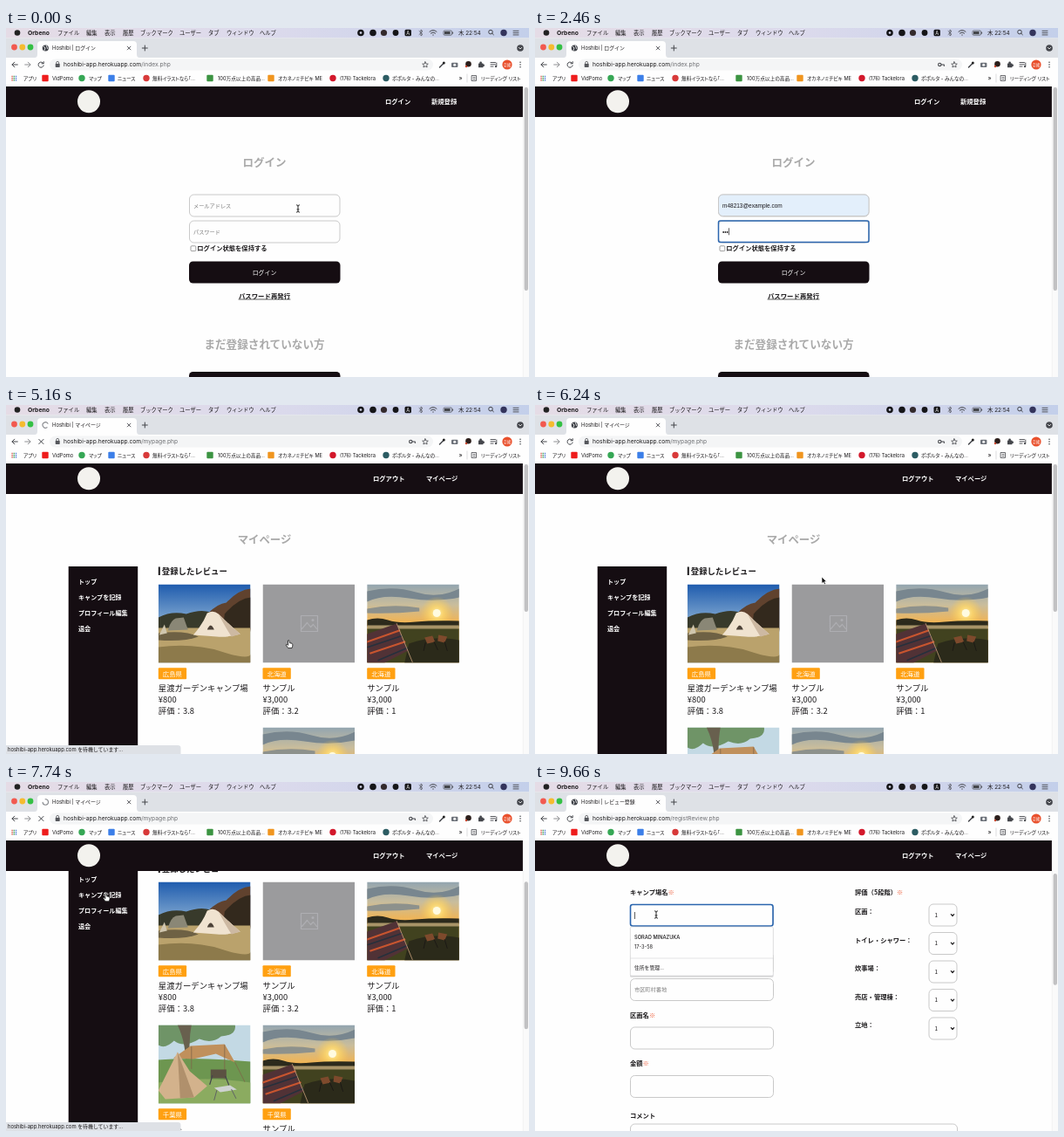
Write an HTML page that moves like this. It is 600x400 px and loops after 9.72 s.

```html
<!DOCTYPE html>
<html lang="ja">
<head>
<meta charset="utf-8">
<style>
html, body { margin: 0; width: 100%; height: 100%; overflow: hidden; background: #fff; }
svg { display: block; width: 100vw; height: 100vh; }
.ui { font-family: Inter, "Noto Sans CJK JP", "Noto Sans CJK", sans-serif; }
.pg { font-family: "Noto Sans CJK JP", "Noto Sans CJK", sans-serif; font-weight: 500; }
.in { font-family: "Liberation Sans", "Noto Sans CJK JP", "Noto Sans CJK", sans-serif; }
.b { font-weight: 700; }
.tight { font-feature-settings: "palt"; }
</style>
</head>
<body>
<svg id="stage" viewBox="0 0 600 400"></svg>
<script>
const INK = '#1c1a1c', DARK = '#150d12', PAPER = '#fefefe', LINE = '#c9c9c9', MUTE = '#a9a9a9', HINT = '#7d7d7d';
const RED = '#ee5a36', BLUE = '#2a65ae', FRAME = '#dee1e6', ICON = '#44464b';
const LOOP = 9720, STEP = 60, SITE = 'hoshibi-app.herokuapp.com';

// y is the vertical centre of the line
const txt = (x, y, s, size = 7.3, fill = INK, cls = 'pg', more = '') =>
  `<text x="${x}" y="${(y + size * .37).toFixed(2)}" font-size="${size}" fill="${fill}" class="${cls}" ${more}>${s}</text>`;
const mid = (x, y, s, size, fill, cls) => txt(x, y, s, size, fill, cls, 'text-anchor="middle"');
const bold = (x, y, s, size = 7.3, fill = INK) => txt(x, y, s, size, fill, 'pg b');
const box = (x, y, w, h, fill, r = 0, more = '') =>
  `<rect x="${x}" y="${y}" width="${w}" height="${h}" rx="${r}" fill="${fill}" ${more}/>`;
const dot = (x, y, r, fill) => `<circle cx="${x}" cy="${y}" r="${r}" fill="${fill}"/>`;
const line = (d, w = 1, c = ICON) =>
  `<path d="${d}" fill="none" stroke="${c}" stroke-width="${w}" stroke-linecap="round" stroke-linejoin="round"/>`;
const fill = (d, c) => `<path d="${d}" fill="${c}"/>`;
const g = (id, body, more = '') => `<g id="${id}" ${more}>${body}</g>`;
const field = (x, y, w, h = 25) => box(x, y, w, h, PAPER, 5, `stroke="${LINE}"`);
const star = `<tspan fill="${RED}">※</tspan>`;

function menuBar() {
  const items = [[59, 'ファイル'], [92, '編集'], [113, '表示'], [134, '履歴'], [154, 'ブックマーク'],
    [199, 'ユーザー'], [232, 'タブ'], [253, 'ウィンドウ'], [291, 'ヘルプ']];
  return box(0, 0, 600, 11.5, 'url(#menu)') + dot(13, 5.5, 3.3, '#222') +
    txt(25, 5.5, 'Orbeno', 6.8, INK, 'ui b') +
    items.map(([x, s]) => txt(x, 5.5, s, 6.3, INK, 'ui')).join('') +
    dot(407, 5.5, 3.8, '#151518') + dot(407, 5.5, 1.3, '#d8d8ea') + dot(421, 5.5, 3.8, '#151518') +
    dot(433.5, 5.5, 3.6, '#33292c') + dot(447, 5.5, 3.4, '#151518') +
    box(457.5, 1.8, 7.4, 7.4, '#151518', 1.5) + mid(461.2, 5.5, 'A', 5.6, '#fff', 'ui') +
    line('M474 3.5 L478 7.3 L476 9 V2 L478 3.7 L474 7.5', .7) +
    line('M486 4.2 Q490 .8 494 4.2 M487.4 6 Q490 3.8 492.6 6 M489.7 8 H490.3', 1) +
    box(502, 3, 9.5, 5.2, 'none', 1.2, `stroke="${ICON}" stroke-width=".7"`) + box(503, 4, 6.6, 3.2, ICON) +
    box(512.2, 4.6, .9, 2, ICON) + txt(519, 5.5, '木 22:54', 6.4, INK, 'ui') +
    line('M559.4 7.8 L557.6 6') + `<circle cx="556" cy="4.6" r="2.3" fill="none" stroke="${ICON}"/>` +
    dot(571, 5.5, 3.7, '#34345c') + line('M582 3.3 H588 M582 5.6 H588 M582 7.9 H588', .9);
}

function tabs() {
  return box(0, 11.5, 600, 22.5, FRAME) +
    dot(9.5, 22, 3.4, '#f2594f') + dot(18.8, 22, 3.4, '#f5bb2f') + dot(28, 22, 3.4, '#34c044') +
    fill('M33 34 Q36 34 36 30 V19 Q36 15 40 15 H146 Q150 15 150 19 V30 Q150 34 153 34 Z', PAPER) +
    g('globe', dot(45.3, 23, 3.6, '#404349') + line('M43 21 L45 23 L44 25.5 M46.5 20.5 L47.5 23.5', .9, '#eee')) +
    g('spin', line('M45.3 19.8 A3.2 3.2 0 1 0 48.5 23', 1.1, '#85878c')) +
    g('title', '', 'clip-path="url(#tabClip)"') +
    line('M139.3 21.2 L143 24.9 M143 21.2 L139.3 24.9', .9) + line('M156.3 23 H162.3 M159.3 20 V26', 1) +
    dot(590, 23, 3.8, '#45474d') + line('M588.4 22.4 L590 24 L591.6 22.4', .8, '#fff');
}

function toolbar() {
  return box(0, 34, 600, 33, PAPER) + box(50, 35.5, 440, 13, '#f4f5f6', 6.5) +
    line('M13.3 42 H7 M9.7 39.2 L7 42 L9.7 44.8') + line('M21.7 42 H28 M25.3 39.2 L28 42 L25.3 44.8', 1, '#8e8f92') +
    g('reload', line('M42.9 40.6 A3.1 3.1 0 1 0 43.2 43 M43.2 38.6 V40.8 H41')) +
    g('stop', line('M37.8 39.4 L43 44.6 M43 39.4 L37.8 44.6')) +
    box(56.7, 41, 5, 3.9, '#55575c', .6) + line('M57.8 41 V39.8 A1.4 1.4 0 0 1 60.6 39.8 V41', .8) + g('url', '') +
    g('key', `<circle cx="464.3" cy="42" r="1.7" fill="none" stroke="${ICON}" stroke-width="1.1"/>` + line('M466 42 H469.3 V43.4', 1.1)) +
    line('M481 38.8 L482 41 L484.3 41.2 L482.6 42.7 L483.1 45 L481 43.8 L478.9 45 L479.4 42.7 L477.7 41.2 L480 41 Z', .8) +
    line('M497.5 45 L502 40.5', 1.5) + dot(502.3, 40, 1.5, '#222') +
    box(511, 39.7, 7.4, 5.2, '#6b7078', 1) + dot(514.7, 42.3, 1.5, '#f5f5f5') +
    dot(530.5, 41.2, 3.3, '#2a1d1a') + dot(528, 44, 1.2, '#c6432b') +
    box(542, 40.4, 5.5, 4.8, ICON, .5) + dot(544.6, 40, 1.4, ICON) + dot(547.7, 42.7, 1.3, ICON) +
    line('M556 39.5 H561.5 M556 41.8 H561.5 M556 44.1 H559 M562.8 40 V44', .9) + dot(562, 44.2, 1.1, ICON) +
    dot(575, 42, 5.6, '#e9502c') + mid(575, 42, '空緒', 4.2, '#fff', 'ui') +
    [39.3, 42, 44.7].map(y => dot(590, y, .8, ICON)).join('');
}

function bookmarks() {
  const y = 57.5, items = [[20, 'アプリ'], [53, 'VidPomo', 45, '#ee1c1c', 1], [95, 'マップ', 87, '#36a755'],
    [128, 'ニュース', 121, '#3c7fe8', 1], [168, '無料イラストなら「...', 161, '#d83a3a'],
    [243, '100万点以上の高品...', 234, '#3c9442', 1], [312, 'オカネノミチビキ ME', 304, '#f0951f', 1],
    [383, '(176) Tackelora', 375, '#d3182b'], [443, 'ポポルタ - みんなの...', 436, '#2c5c63']];
  const label = (x, s) => txt(x, y, s, 5.7, INK, 'ui tight');
  let s = '';
  for (let i = 0; i < 9; i++)
    s += box(6.4 + i % 3 * 2.2, 54.8 + Math.floor(i / 3) * 2.2, 1.4, 1.4, ['#d65a4e', '#3f9a56', '#4a78d5'][i % 3]);
  for (const [x, name, ix, c, sq] of items)
    s += label(x, name) + (ix ? sq ? box(ix - 3.7, y - 3.7, 7.4, 7.4, c, 1) : dot(ix, y, 3.7, c) : '');
  return s + txt(519.5, y, '»', 7, INK, 'ui') + line('M529 53 V62', .6, '#c6c7ca') +
    line('M534.5 54.5 H539.5 V60.5 H534.5 Z M536 56.5 H538 M536 58.5 H538', .8) + label(545, 'リーディング リスト');
}

function login() {
  return mid(296.5, 154, 'ログイン', 12.5, MUTE, 'pg b') + field(210.5, 191, 172.5) + field(210.5, 221, 172.5) +
    g('mailFill', box(210.5, 191, 172.5, 24.5, '#e3effb', 5, `stroke="${LINE}"`) +
      txt(215, 203.3, 'm48213@example.com', 6.5, INK, 'in')) +
    g('mailHint', txt(215, 203.3, 'メールアドレス', 6.2, HINT)) +
    g('passHint', txt(215, 233.3, 'パスワード', 6.2, HINT)) +
    g('ring', box(210.5, 0, 172.5, 24.5, 'none', 2, `stroke="${BLUE}" stroke-width="1.5"`)) +
    g('dots', '') + g('caret', box(0, -4, .7, 8, INK)) +
    box(212, 249.8, 5.8, 5.8, '#fff', 1, 'stroke="#777" stroke-width=".7"') +
    bold(219.3, 252.7, 'ログイン状態を保持する') + box(210, 267.5, 173.5, 25, DARK, 4.5) +
    mid(296.5, 280.2, 'ログイン', 6.9, '#fff') + mid(296.5, 306.8, 'パスワード再発行', 7.4, INK, 'pg b') +
    line('M267 311 H326', .7, INK) +
    mid(296.5, 362.5, 'まだ登録されていない方', 12.6, MUTE, 'pg b') + box(210, 394, 173.5, 25, DARK, 4.5);
}

// photos are drawn in a 105.5 x 90 frame
const photos = {
  field: box(0, 0, 106, 90, 'url(#blue)') +
    fill('M56 34 Q68 22 78 21 Q92 6 106 5 V54 H53 Z', '#60422e') + fill('M76 34 Q92 16 106 15 V52 H74 Z', '#33291d') +
    fill('M0 38 Q15 30 32 34 Q48 28 60 32 V53 H0 Z', '#383a2b') + box(0, 50, 106, 40, '#baa26c') +
    fill('M0 56 Q30 52 46 60 Q30 66 0 64 Z', '#6e6144') + fill('M0 72 Q40 67 72 77 T106 80 V90 H0 Z', '#8d7a4b') +
    fill('M11 53 Q14 41 20 39 L29 38 L34 52 Z', '#8a8776') + fill('M1 58 L7 46 L10 56 Z', '#d0c6ae') +
    fill('M40 58 Q51 46 56 33 Q63 29 69 34 Q80 45 94 57 Q80 61 67 60 Z', '#f0e3d0') +
    fill('M69 34 Q80 45 94 57 L84 60 Q76 48 69 34 Z', '#cdb9a2') + fill('M56 52 Q60 42 64 52 Z', '#4d4238'),
  none: box(0, 0, 106, 90, '#9b9b9d') + line('M44 36 H63 V54 H44 Z M45 51 L51 44 L55 49 L58 46 L62 51', 1.2, '#aeaeb2') +
    dot(57.5, 41, 1.5, '#aeaeb2'),
  dusk: box(0, 0, 106, 90, 'url(#dusk)') + fill('M0 8 Q30 1 56 9 T106 5 V15 Q78 21 48 16 T0 20 Z', '#78868f') +
    fill('M0 28 Q30 22 60 27 V31 Q30 34 0 33 Z', '#8d918c') + dot(80, 33, 19, 'url(#sun)') + dot(80, 33, 4.5, '#fffbe0') +
    fill('M0 41 Q12 37 24 41 T56 43 T106 42 V48 H0 Z', '#2c2a1c') + box(0, 47, 106, 5, '#a89468') +
    box(0, 51, 106, 39, '#41421f') + fill('M48 68 Q76 58 106 64 V90 H43 Z', '#2b2a1a') +
    fill('M0 57 L34 45 L47 76 L20 90 H0 Z', '#513236') +
    line('M0 66 L37 53 M4 79 L43 66', 2.2, '#c8552f') + line('M1 72 L40 59 M13 87 L46 73', 1.7, '#26303c') +
    line('M34 45 L52 89', .8, '#caa37b') + fill('M66 61 L75 59 L78 66 L69 68 Z M82 58 L92 60 L89 67 L81 65 Z', '#7e4a2c') +
    line('M67 67 L65 76 M77 66 L81 75 M89 66 L92 76', 1, '#1c1915'),
  tent: box(0, 0, 106, 90, '#c3d9e4') + fill('M0 0 H88 Q90 12 72 13 Q62 22 47 16 Q29 27 18 18 Q8 28 0 23 Z', '#6f9467') +
    fill('M22 0 H38 Q34 20 37 52 H31 Q33 23 22 0 Z', '#68604e') + fill('M0 40 Q40 36 106 42 V90 H0 Z', '#6d9650') +
    fill('M0 66 Q55 58 106 66 V90 H0 Z', '#8bab60') + fill('M17 38 L37 24 L76 22 L88 43 L66 33 L40 39 Z', '#c0905c') +
    line('M76 23 V62 M88 43 L99 65 M38 25 V50', .8, '#7f6648') + fill('M0 75 L22 31 L36 53 L56 70 L41 83 L8 85 Z', '#d3b28c') +
    fill('M22 31 L25 84 L41 83 Z', '#b0906c') + fill('M60 51 H78 V61 H60 Z', '#5b5242') + line('M62 58 L59 68 M77 59 L81 69', 1.2) +
    fill('M64 72 L82 69 L90 74 L71 77 Z', '#cfd3d2') + line('M67 75 L64 86 M84 74 L89 84', 1, '#5f6264')
};

function card(i, photo, pref, name, price, rate) {
  const x = 174.8 + i % 3 * 119.7, y = 205.5 + Math.floor(i / 3) * 164;
  return `<g transform="translate(${x} ${y})"><g id="photo${i}" clip-path="url(#photoClip)">${photos[photo]}</g>` +
    box(0, 95.7, 32.3, 13, '#ffa011', 1) + mid(16.1, 102.3, pref, 7.4, '#fff') + txt(0, 119, name, 9.4) +
    txt(0, 132, price, 9.4) + txt(0, 144.7, '評価：' + rate, 9.4) + '</g>';
}

function myPage() {
  return mid(296.5, 154, 'マイページ', 12.4, MUTE, 'pg b') + box(71.7, 185, 79.5, 300, DARK) +
    ['トップ', 'キャンプを記録', 'プロフィール編集', '退会'].map((s, i) => bold(83, 202 + i * 18, s, 7.1, '#fff')).join('') +
    box(174.8, 185.5, 2, 9.5, INK) + bold(178.8, 190.3, '登録したレビュー', 9.4) +
    card(0, 'field', '広島県', '星渡ガーデンキャンプ場', '¥800', '3.8') + card(1, 'none', '北海道', 'サンプル', '¥3,000', '3.2') +
    card(2, 'dusk', '北海道', 'サンプル', '¥3,000', '1') + card(3, 'tent', '千葉県', 'テスト', '¥3,000', '3') +
    card(4, 'dusk', '千葉県', 'サンプル', '¥3,000', '3');
}

function review() {
  const arrow = (x, y) => line(`M${x - 1.7} ${y - .8} L${x} ${y + 1} L${x + 1.7} ${y - .8}`, 1.2, INK);
  const rows = ['区画', 'トイレ・シャワー', '炊事場', '売店・管理棟', '立地'];
  return mid(296.5, 154, 'レビュー登録', 12.4, MUTE, 'pg b') + bold(109, 189.5, star + 'は必須入力項目です。') +
    g('form', bold(0, 222.5, 'キャンプ場名' + star) + field(.5, 237, 164) + bold(0, 278, '住所') + field(.5, 292, 164) +
      bold(7, 304.5, '都道府県', 6.2) + arrow(159, 304.5) + field(.5, 322, 164) + txt(5, 334.5, '市区町村番地', 6.2, HINT) +
      bold(0, 363.7, '区画名' + star) + field(.5, 377.5, 164) + bold(0, 418.8, '金額' + star) + field(.5, 433, 164)) +
    g('wide', bold(367, 222.5, '評価（5段階）' + star) +
      rows.map((s, i) => bold(367, 245 + i * 32.5, s + '：') + field(452, 236.5 + i * 32.5, 32) +
        txt(458.5, 249 + i * 32.5, '1', 6.5) + arrow(479, 249 + i * 32.5)).join('') +
      bold(109, 479, 'コメント') + field(109.5, 488.5, 375, 70)) +
    g('focus', box(109.5, 237, 163.5, 24.5, PAPER, 2.5, `stroke="${BLUE}" stroke-width="1.6"`) + box(114.2, 245.5, .7, 8, INK)) +
    g('popup', box(109, 263.2, 164.5, 57, '#b9b9bb', 1.5, 'opacity=".55"') + box(109.3, 262.5, 164, 56, PAPER, 1.5, 'stroke="#d2d2d4" stroke-width=".6"') +
      txt(114, 274.8, 'SORAO MINAZUKA', 5.7, INK, 'ui', 'font-weight="500"') + txt(114, 285, '17-3-58', 5.7, INK, 'ui') +
      line('M109.5 298.5 H273', .6, '#d2d2d4') + txt(114, 309, '住所を管理...', 5.8, INK, 'ui'));
}

const cursors =
  g('beam', line('M-1.6 -4.2 Q0 -4.2 0 -3 V3 Q0 4.2 -1.6 4.2 M1.6 -4.2 Q0 -4.2 0 -3 M1.6 4.2 Q0 4.2 0 3 M-1 .9 H1', .9, '#1a1a1a')) +
  g('arrow', '<path d="M-1.5 -4 V3.6 L.3 2 L1.6 4.7 L2.9 4.1 L1.7 1.5 H4 Z" fill="#111" stroke="#fff" stroke-width=".6"/>') +
  g('hand', '<path d="M-1.6 -4 Q-.6 -4.8 0 -3.8 L.5 -1.2 Q3.8 -1.5 3.9 .8 Q3.8 2.6 3 4.6 H-1.3 L-3.9 1 Q-3.6 -.1 -2.4 .6 L-1.3 1.3 Z" fill="#fff" stroke="#151515" stroke-width=".8"/>');

const grad = (id, kind, stops, dir = '') => `<${kind}Gradient id="${id}" ${dir}>` +
  stops.map(([o, c, a = 1]) => `<stop offset="${o}" stop-color="${c}" stop-opacity="${a}"/>`).join('') + `</${kind}Gradient>`;
const down = 'x2="0" y2="1"';
const navs = (id, a, x, b, x2) => g(id, bold(x, 84.5, a, 7.3, '#fff') + bold(x2, 84.5, b, 7.3, '#fff'));

document.getElementById('stage').innerHTML =
  '<defs><clipPath id="tabClip"><rect x="52" y="15" width="83" height="18"/></clipPath>' +
  '<clipPath id="photoClip"><rect width="105.5" height="90"/></clipPath>' +
  grad('menu', 'linear', [[0, '#e5dce6'], [.5, '#dcdaec'], [1, '#c3cfea']]) +
  grad('blue', 'linear', [[0, '#1f5cae'], [.5, '#86acd2']], down) +
  grad('dusk', 'linear', [[0, '#93a5b0'], [.26, '#c9bd9c'], [.48, '#f0b455']], down) +
  grad('sun', 'radial', [[0, '#fff3b0'], [.4, '#ffd86a', .8], [1, '#ffc94c', 0]]) + '</defs>' +
  box(0, 0, 600, 400, PAPER) + g('login', login()) + g('mypage', myPage()) + g('review', review()) +
  box(0, 67, 593, 35, DARK) + dot(95, 84.3, 13, '#f3f2ee') +
  navs('guest', 'ログイン', 435, '新規登録', 488) + navs('member', 'ログアウト', 421, 'マイページ', 482) +
  box(593, 67, 7, 333, '#fafafa') + line('M593.2 67 V400', .4, '#e2e2e2') +
  '<rect id="thumb" x="594.6" width="4.4" rx="2.2" fill="#c1c1c3"/>' +
  menuBar() + tabs() + toolbar() + bookmarks() +
  g('status', fill('M0 390 H197 Q200.5 390 200.5 393 V400 H0 Z', FRAME) + txt(2, 395.2, SITE + ' を待機しています...', 5.9, INK, 'ui')) +
  g('cursor', cursors);

const $ = id => document.getElementById(id);
const show = (id, on) => $(id).style.display = on ? '' : 'none';
const move = (id, x, y) => $(id).setAttribute('transform', `translate(${x} ${y})`);
const within = (t, a, b) => t >= a && t < b;
const ease = (t, a, b) => { const k = Math.min(1, Math.max(0, (t - a) / (b - a))); return k * k * (3 - 2 * k); };

const cache = {};
function put(id, html) {
  if (cache[id] !== html) $(id).innerHTML = cache[id] = html;
}

// time, x, y
const path = [[0, 335, 207], [600, 335, 207], [900, 318, 204], [1500, 318, 204], [1740, 300, 233], [3000, 300, 233],
  [3600, 325, 274], [5520, 325, 274], [6180, 330.5, 201], [6300, 330.5, 201], [6780, 123, 139], [7260, 123, 139],
  [7800, 115, 132], [8700, 115, 132], [9120, 139, 152], [LOOP, 139, 152]];
// each look lasts until the next time
const looks = [[0, 'beam'], [1860, ''], [3000, 'beam'], [3240, 'arrow'], [3420, 'hand'], [5880, 'arrow'],
  [6660, 'hand'], [8640, 'arrow'], [9000, 'beam']];

function pointer(t) {
  const i = path.findIndex(p => p[0] > t), [a, x, y] = path[i - 1], [b, x2, y2] = path[i], k = ease(t, a, b);
  move('cursor', x + (x2 - x) * k, y + (y2 - y) * k);
  const look = looks.filter(l => l[0] <= t).pop()[1];
  for (const id of ['beam', 'arrow', 'hand']) show(id, id === look);
}

function draw(t) {
  const page = t < 5160 ? 'login' : t < 8280 ? 'mypage' : 'review';
  const wide = t >= 8640, busy = within(t, 4080, 5580) || within(t, 7200, 8640);
  for (const id of ['login', 'mypage', 'review']) show(id, id === page);
  show('guest', page === 'login');
  show('member', page !== 'login');

  const filled = t >= 1500, pass = t >= 1740, typed = Math.max(0, Math.min(6, Math.floor((t - 2040) / 120)));
  show('mailFill', filled);
  show('mailHint', !filled);
  show('passHint', !typed);
  show('ring', within(t, 900, 3900));
  move('ring', 0, pass ? 221 : 191);
  put('dots', txt(215, 233.3, '•'.repeat(typed), 6.5, INK, 'in'));
  show('caret', within(t, 900, 3900) && (within(t, 2040, 2820) || t % 1000 < 500));
  move('caret', !pass ? 215 : 215.3 + typed * 2.28, pass ? 233.3 : 203.3);

  const scroll = page === 'mypage' ? 91 * ease(t, 6300, 6720) : page === 'review' ? 96.5 * ease(t, 8760, 9120) : 0;
  move(page, 0, -scroll);
  show('photo3', t >= 5580);
  move('form', wide ? 109 : 167.7, 0);
  show('wide', wide);
  show('focus', t >= 9240);
  show('popup', t >= 9300);

  const total = page === 'mypage' ? 656 : wide ? 868 : 476;
  $('thumb').setAttribute('y', 68 + scroll * 333 / total);
  $('thumb').setAttribute('height', 333 * 333 / total);

  const file = { login: 'index', mypage: 'mypage', review: 'registReview' }[page];
  const name = { login: 'ログイン', mypage: 'マイページ', review: 'レビュー登録' }[page];
  put('url', txt(66, 42, `${SITE}<tspan fill="#6d6e72">/${file}.php</tspan>`, 6.7, INK, 'ui'));
  put('title', txt(53, 23.2, page === 'review' && !wide ? 'https://' + SITE : 'Hoshibi | ' + name, 5.9, INK, 'ui'));
  show('globe', !busy);
  show('spin', busy);
  $('spin').setAttribute('transform', `rotate(${t * .36 % 360} 45.3 23)`);
  show('reload', !busy);
  show('stop', busy);
  show('status', within(t, 4140, 5580) || within(t, 7260, 8640));
  show('key', within(t, 1500, 8280));
  pointer(t);
}

const start = performance.now();
function tick() {
  const t = (performance.now() - start) % LOOP;
  draw(Math.floor(t / STEP) * STEP);
  requestAnimationFrame(tick);
}
tick();
</script>
</body>
</html>
```
